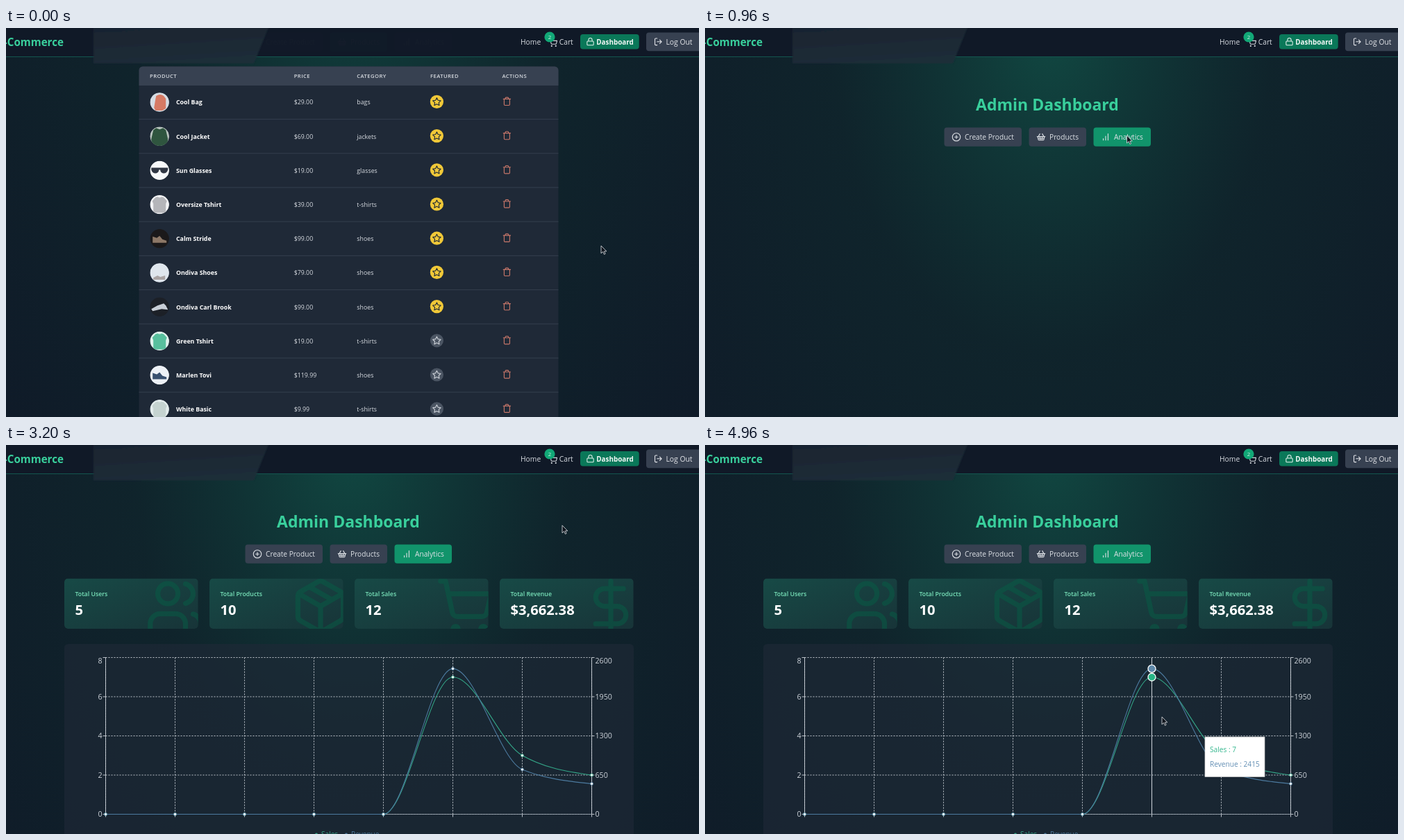
Animation of 998x561 px, one loop 5.04 s. Source, as an HTML page:

```html
<!DOCTYPE html>
<html lang="en">
<head>
<meta charset="utf-8">
<title>Admin Dashboard</title>
<style>
  html, body { margin: 0; width: 100%; height: 100%; overflow: hidden; background: #111827; }
  svg { display: block; width: 100%; height: 100%; }
  text { font-family: "Open Sans", "Noto Sans", sans-serif; white-space: pre; }
</style>
</head>
<body>
<svg id="stage" viewBox="0 0 998 561"></svg>
<script>
const LOOP = 5040, STEP = 80;
const SWITCH = 960, MOUNT = 1025, HOVER = 3760, NEXT_POINT = 4880;

// ---------- markup helpers ----------
const circle = (x, y, r, fill, extra = '') =>
  `<circle cx="${x}" cy="${y}" r="${r}" fill="${fill}" ${extra}/>`;
const rect = (x, y, w, h, r, fill, extra = '') =>
  `<rect x="${x}" y="${y}" width="${w}" height="${h}" rx="${r}" fill="${fill}" ${extra}/>`;
const line = (x1, y1, x2, y2, color, extra = '') =>
  `<path d="M${x1} ${y1}L${x2} ${y2}" stroke="${color}" fill="none" ${extra}/>`;
const text = (x, y, size, fill, str, weight = 500, extra = '') =>
  `<text x="${x}" y="${y}" font-size="${size}" fill="${fill}" font-weight="${weight}" ${extra}>${str}</text>`;

const ring = (x, y, r) => `M${x - r} ${y}a${r} ${r} 0 1 0 ${2 * r} 0a${r} ${r} 0 1 0 ${-2 * r} 0`;
const ICONS = {
  star: 'M12 2l3.09 6.26 6.91 1.01-5 4.87 1.18 6.88L12 17.77l-6.18 3.25L7 14.14 2 9.27l6.91-1.01z',
  trash: 'M3 6h18M19 6v14c0 1-1 2-2 2H7c-1 0-2-1-2-2V6M8 6V4c0-1 1-2 2-2h4c1 0 2 1 2 2v2',
  plus: ring(12, 12, 10) + 'M8 12h8M12 8v8',
  basket: 'M15 11l-1 9M19 11l-4-7M2 11h20M3.5 11l1.6 7.4a2 2 0 0 0 2 1.6h9.8a2 2 0 0 0 2-1.6l1.7-7.4M4.5 15.5h15M5 11l4-7M9 11l1 9',
  bars: 'M12 20V10M18 20V4M6 20v-4',
  cart: ring(8, 21, 1) + ring(19, 21, 1) +
    'M2 2h2l2.7 12.5a2 2 0 0 0 2 1.6h9.8a2 2 0 0 0 1.9-1.6l1.7-7.4H5.1',
  lock: 'M5 11h14a2 2 0 0 1 2 2v7a2 2 0 0 1-2 2H5a2 2 0 0 1-2-2v-7a2 2 0 0 1 2-2zM7 11V7a5 5 0 0 1 10 0v4',
  exit: 'M9 21H5a2 2 0 0 1-2-2V5a2 2 0 0 1 2-2h4M16 17l5-5-5-5M21 12H9',
  users: ring(9, 7, 4) + 'M16 21v-2a4 4 0 0 0-4-4H6a4 4 0 0 0-4 4v2M22 21v-2a4 4 0 0 0-3-3.87M16 3.13a4 4 0 0 1 0 7.75',
  box: 'M21 8a2 2 0 0 0-1-1.73l-7-4a2 2 0 0 0-2 0l-7 4A2 2 0 0 0 3 8v8a2 2 0 0 0 1 1.73l7 4a2 2 0 0 0 2 0l7-4A2 2 0 0 0 21 16zM3.3 7l8.7 5 8.7-5M12 22V12M7.5 4.27l9 5.15',
  dollar: 'M12 2v20M17 5H9.5a3.5 3.5 0 0 0 0 7h5a3.5 3.5 0 0 1 0 7H6'
};
const icon = (name, cx, cy, size, color) =>
  `<path d="${ICONS[name]}" transform="translate(${cx - size / 2} ${cy - size / 2}) scale(${size / 24})"
    fill="none" stroke="${color}" stroke-width="2" stroke-linecap="round" stroke-linejoin="round"/>`;

// ---------- products table ----------
const TEE = 'M-6 -10L-3 -11Q0 -9 3 -11L6 -10L10.5 -5L9 -1V12H-9V-1L-10.5 -5Z';
const SHOE = 'M-10 -3L-4 -1L0 -4L4 1L10 3V6H-10Z';
const PRODUCTS = [
  ['Cool Bag', '$29.00', 'bags', '#d5dce3', '#d67a64', 'M-5 -9Q1 -13 6 -9L9 -5V9L4 12H-6L-8 8L-6 -4Z'],
  ['Cool Jacket', '$69.00', 'jackets', '#b9c4bf', '#2f553f', 'M-5 -12L0 -10L5 -12L9 -9L12 4L11 14H-11L-12 4L-9 -9Z'],
  ['Sun Glasses', '$19.00', 'glasses', '#f7f9fb', '#303744', 'M-12 -4H12V-1Q10 5 5 4Q1 3 1 -1H-1Q-1 3 -5 4Q-10 5 -12 -1Z'],
  ['Oversize Tshirt', '$39.00', 't-shirts', '#f1f2f4', '#b4b5b9', TEE],
  ['Calm Stride', '$99.00', 'shoes', '#1b191a', '#8d7867', SHOE],
  ['Ondiva Shoes', '$79.00', 'shoes', '#dfe6ed', '#aaa4a4', 'M-9 7L-3 4L1 6L8 4V10H-9Z'],
  ['Ondiva Carl Brook', '$99.00', 'shoes', '#1c2027', '#c8ced6', 'M-12 3L-3 -2L6 -5L9 -2L12 4L3 3L-10 6Z'],
  ['Green Tshirt', '$19.00', 't-shirts', '#e0f1ec', '#58bf9d', TEE],
  ['Marlen Tovi', '$119.99', 'shoes', '#edf1f6', '#38506f', SHOE],
  ['White Basic', '$9.99', 't-shirts', '#e3ecec', '#c5d3d0', TEE]
];
const FEATURED = 7, ROW = 49.2;

function productRow([name, price, kind, back, tone, shape], i) {
  const y = 244 + i * ROW, lit = i < FEATURED;
  return line(191.5, y + 24.6, 795.5, y + 24.6, '#374151', 'stroke-width=".9"') +
    `<g transform="translate(221.2 ${y})" clip-path="url(#thumb)">${circle(0, 0, 14, back)}<path d="${shape}" fill="${tone}"/></g>` +
    text(245, y + 3.3, 8.8, '#fff', name, 700) +
    text(414.7, y + 3.3, 8.8, '#d6dae0', price) +
    text(505.3, y + 3.3, 8.8, '#d6dae0', kind) +
    circle(620.4, y - .6, 9.6, lit ? '#f0c838' : '#4b5563') +
    icon('star', 620.4, y - .6, 13.7, lit ? '#1f2937' : '#cbd0d7') +
    icon('trash', 721.4, y - 1.2, 13.7, '#c8776a');
}

function productTable() {
  const heads = [[207, 'PRODUCT'], [414.7, 'PRICE'], [505.3, 'CATEGORY'], [611, 'FEATURED'], [714.5, 'ACTIONS']];
  return rect(191.5, 192.5, 604, 568, 5.5, '#1f2937') +
    '<path d="M191.5 220V198a5.5 5.5 0 0 1 5.5-5.5H790a5.5 5.5 0 0 1 5.5 5.5V220Z" fill="#374151"/>' +
    heads.map(([x, s]) => text(x, 208.9, 7.7, '#d6dae0', s, 600, 'letter-spacing=".4"')).join('') +
    PRODUCTS.map(productRow).join('');
}

// ---------- analytics ----------
const CARDS = [
  ['Total Users', '5', 'users'], ['Total Products', '10', 'box'],
  ['Total Sales', '12', 'cart'], ['Total Revenue', '$3,662.38', 'dollar']
];
function statCard([label, value, pic], i) {
  const x = 84 + i * 209;
  return `<g id="card${i}"><g clip-path="url(#clip${i})">` +
    rect(x, 192.5, 192.7, 72.5, 5, '#1f2937') +
    rect(x, 192.5, 192.7, 72.5, 5, 'url(#sheen)') +
    `<g opacity=".5">${icon(pic, x + 160, 232.5, 87, '#065f46')}</g></g>` +
    text(x + 15.4, 218.2, 8.8, '#78e2b9', label, 600) +
    text(x + 15.4, 245.2, 20.2, '#fff', value, 700) + '</g>';
}

const SALES = [0, 0, 0, 0, 0, 7, 3, 2];
const REVENUE = [0, 0, 0, 0, 0, 2415, 742.2, 505.18];
const GREEN = '#33a587', BLUE = '#4c7a9f', INK = '#cdd3da';
const BASE = 532.5, HIGH = 226;
const px = i => 143.5 + i * 100;
const plot = (data, max) => data.map((v, i) => [px(i), BASE - v / max * HIGH]);
const salesPts = plot(SALES, 8), revenuePts = plot(REVENUE, 2600);

// Monotone cubic through evenly spaced points
function curve(pts) {
  const n = pts.length - 1, h = 100;
  const s = pts.slice(1).map((p, i) => (p[1] - pts[i][1]) / h);
  const m = pts.map((p, i) => i && i < n
    ? (Math.sign(s[i - 1]) + Math.sign(s[i])) *
      Math.min(Math.abs(s[i - 1]), Math.abs(s[i]), Math.abs(s[i - 1] + s[i]) / 4)
    : 0);
  m[0] = (3 * s[0] - m[1]) / 2;
  m[n] = (3 * s[n - 1] - m[n - 1]) / 2;
  return pts.map(([x, y], i) => i
    ? `C${x - h * 2 / 3} ${pts[i - 1][1] + m[i - 1] * h / 3} ${x - h / 3} ${y - m[i] * h / 3} ${x} ${y}`
    : `M${x} ${y}`).join('');
}

function chart() {
  let s = rect(84, 287, 820, 330, 5.5, '#1f2937', 'opacity=".62"');
  const dash = 'stroke-dasharray="2 2" stroke-width=".9"', thin = 'stroke-width=".9"';
  for (let i = 0; i < 5; i++) {
    const y = BASE - i * HIGH / 4, ty = y + (i === 4 ? 8.3 : 3.9);
    s += line(143.5, y, 843.5, y, INK, dash) +
      line(139.5, y, 143.5, y, INK, thin) + line(843.5, y, 847.5, y, INK, thin) +
      text(138.6, ty, 10.7, INK, i * 2, 400, 'text-anchor="end"') +
      text(848.5, ty, 10.7, INK, i * 650, 400);
  }
  for (let i = 0; i < 8; i++) {
    s += line(px(i), 306.5, px(i), BASE, INK, dash) + line(px(i), BASE, px(i), BASE + 4, INK, thin);
  }
  s += line(143.5, 306.5, 143.5, BASE, INK, thin) + line(843.5, 306.5, 843.5, BASE, INK, thin) +
    line(143.5, BASE, 843.5, BASE, '#9aa4af', thin);
  s += line(0, 306.5, 0, BASE, INK, 'id="guide"');
  const stroke = (id, pts, color) =>
    `<path id="${id}" d="${curve(pts)}" fill="none" stroke="${color}" stroke-width="1.1" pathLength="1"/>`;
  s += stroke('sales', salesPts, GREEN) + stroke('revenue', revenuePts, BLUE);
  const dots = (pts, color) => pts.map(([x, y]) => circle(x, y, 2, '#fff', `stroke="${color}" stroke-width=".8"`)).join('');
  s += `<g id="dots">${dots(salesPts, GREEN)}${dots(revenuePts, BLUE)}</g>`;
  const big = 'stroke="#fff" stroke-width="1.3"';
  s += `<g id="active">${circle(0, 0, 5.5, '#27b485', 'id="onSales" ' + big)}${circle(0, 0, 5.5, '#5d88a9', 'id="onRevenue" ' + big)}</g>`;
  s += circle(447, 561.5, 2, GREEN) + text(454, 564.6, 10.1, GREEN, 'Sales') +
    circle(490, 561.5, 2, BLUE) + text(497, 564.6, 10.1, BLUE, 'Revenue');
  return `<g id="chart">${s}</g>`;
}

const tooltip = '<g id="tip">' +
  rect(0, 0, 89, 57.5, 0, '#fff', 'id="tipBox" stroke="#ccc" stroke-width=".7"') +
  text(7, 21.6, 10.15, '#35b78f', '', 400, 'id="tipSales"') +
  text(7, 43.2, 10.15, '#638fb4', '', 400, 'id="tipRevenue"') + '</g>';

// ---------- page frame ----------
const TABS = [
  ['Create Product', 'plus', 344.5, 111.5],
  ['Products', 'basket', 466.5, 82.5],
  ['Analytics', 'bars', 559.5, 82.5]
];
const tab = ([label, pic, x, w], i) =>
  rect(x, 143.5, w, 27.3, 4, '#374151', `id="tab${i}"`) +
  icon(pic, x + 17.5, 157.2, 13.7, '#d9dde2') +
  text(x + 29.5, 160.8, 10.2, '#dde1e6', label);

const nav =
  rect(-2, -2, 1002, 43.5, 0, '#111927', 'opacity=".98"') +
  line(0, 41.5, 998, 41.5, '#14564f') +
  '<path d="M126 -3H379L357 51H126Z" fill="url(#smoke)" filter="url(#soft)"/>' +
  text(83, 26.2, 15.2, '#39cf9c', 'E-Commerce', 700, 'text-anchor="end"') +
  text(741, 23.8, 10.3, '#d6dae0', 'Home') +
  icon('cart', 788, 21, 13, '#d1d5db') +
  circle(783, 13, 7.6, '#12a877') +
  text(783, 15.8, 7.8, '#d5f2e6', '2', 400, 'text-anchor="middle"') +
  text(796.7, 23.8, 10.3, '#d6dae0', 'Cart') +
  rect(827, 9, 84.7, 21.6, 4, '#0a7859') +
  icon('lock', 841.5, 19.6, 12.4, '#e8f3ef') +
  text(850.3, 23.7, 9.9, '#f2f8f6', 'Dashboard', 700) +
  rect(922, 6.5, 82, 26.7, 4, '#374151') +
  icon('exit', 939.3, 19.8, 12.8, '#e5e7eb') +
  text(950.5, 23.8, 10.3, '#e5e7eb', 'Log Out');

const stop = (at, color, alpha = 1) => `<stop offset="${at}" stop-color="${color}" stop-opacity="${alpha}"/>`;
const defs = `<defs>
  <radialGradient id="glow" gradientUnits="userSpaceOnUse" cx="0" cy="0" r="1" gradientTransform="translate(499 0) scale(706 1046)">
    ${stop(0, '#10b981', .3)}${stop(.45, '#0a503c', .21)}${stop(1, '#0a202c', .25)}</radialGradient>
  <linearGradient id="sheen" x1="0" y1="0" x2="1" y2="1">${stop(0, '#059669', .3)}${stop(1, '#064e3b', .3)}</linearGradient>
  <linearGradient id="smoke" x1="0" y1="0" x2=".3" y2="1">${stop(0, '#19232f')}${stop(1, '#1d2d38')}</linearGradient>
  <filter id="soft"><feGaussianBlur stdDeviation="1.3"/></filter>
  <clipPath id="thumb"><circle r="13.7"/></clipPath>
  ${CARDS.map((c, i) => `<clipPath id="clip${i}">${rect(84 + i * 209, 192.5, 192.7, 72.5, 5, '#000')}</clipPath>`).join('')}
</defs>`;

document.getElementById('stage').innerHTML = defs + rect(0, 0, 998, 561, 0, '#111827') +
  '<g id="page">' + rect(0, 0, 998, 900, 0, 'url(#glow)') +
  text(493, 118.6, 23, '#39cf9c', 'Admin Dashboard', 700, 'text-anchor="middle"') +
  TABS.map(tab).join('') +
  `<g id="products">${productTable()}</g>` +
  `<g id="analytics">${CARDS.map(statCard).join('')}${chart()}${tooltip}</g></g>` + nav +
  '<path id="pointer" d="M0 0V11L2.6 8.6L4.4 12.5L6.1 11.7L4.4 8H7.8Z" fill="#10151d" stroke="#e3e6ea" stroke-width=".8"/>';

// ---------- motion ----------
const el = {};
document.querySelectorAll('#stage [id]').forEach(e => { el[e.id] = e; });
const set = (id, attrs) => { for (const k in attrs) el[id].setAttribute(k, attrs[k]); };
const show = (id, on) => set(id, { display: on ? 'inline' : 'none' });
const move = (id, x, y) => set(id, { transform: `translate(${x} ${y})` });
const clamp = u => Math.max(0, Math.min(1, u));
const easeOut = u => 1 - (1 - u) ** 2;

// CSS "ease": cubic-bezier(.25, .1, .25, 1)
function ease(u) {
  let lo = 0, hi = 1, k = .5;
  for (let i = 0; i < 24; i++) {
    k = (lo + hi) / 2;
    const x = .75 * k * (1 - k) + k ** 3;
    if (x < u) lo = k; else hi = k;
  }
  return .3 * k * (1 - k) ** 2 + 3 * k * k * (1 - k) + k ** 3;
}

// Position on a track of [time, x, y] keys
function along(keys, t) {
  const i = keys.findIndex(k => k[0] > t);
  if (i < 0) return keys[keys.length - 1].slice(1);
  if (!i) return keys[0].slice(1);
  const [t0, x0, y0] = keys[i - 1], [t1, x1, y1] = keys[i];
  const u = (t - t0) / (t1 - t0);
  return [x0 + (x1 - x0) * u, y0 + (y1 - y0) * u];
}
const POINTER = [
  [0, 857, 314], [400, 857, 312], [480, 845, 300], [640, 740, 222], [800, 622, 165], [880, 605, 156],
  [1040, 610, 154], [1200, 730, 128], [1360, 801, 118], [2240, 801, 114], [3280, 801, 116],
  [3440, 799, 160], [3600, 793, 265], [3760, 782, 395], [3840, 779, 421], [4240, 774, 428],
  [4560, 770, 424], [4720, 742, 413], [4880, 690, 400], [4960, 658, 392]
];
const TIP = [
  [3760, 100, 302], [3840, 327, 338], [3920, 492, 373], [4000, 597, 398], [4080, 662, 414],
  [4240, 725.5, 429], [4400, 749, 437], [4560, 753, 434], [4880, 753, 425], [4960, 720, 421]
];

function fadeUp(id, t, start) {
  const p = easeOut(clamp((t - start) / 500));
  set(id, { opacity: p });
  move(id, 0, 13.6 * (1 - p));
}

function update(t) {
  move('page', 0, -137 * (1 - clamp(t / 340)) ** 1.6);
  const [cx, cy] = along(POINTER, t);
  move('pointer', cx, cy);

  const picked = t < SWITCH ? 1 : 2;
  TABS.forEach((_, i) => set('tab' + i, { fill: i === picked ? '#11946b' : '#374151' }));
  show('products', t < SWITCH);
  show('analytics', t >= MOUNT);

  CARDS.forEach((_, i) => fadeUp('card' + i, t, MOUNT));
  fadeUp('chart', t, MOUNT + 241);
  const drawn = ease(clamp((t - MOUNT) / 1500));
  const whole = t >= MOUNT + 1500;
  for (const id of ['sales', 'revenue']) {
    set(id, { 'stroke-dasharray': whole ? 'none' : `${drawn} 2` });
  }
  show('dots', whole);

  const hover = t >= HOVER, k = t < NEXT_POINT ? 6 : 5;
  for (const id of ['guide', 'active', 'tip']) show(id, hover);
  move('guide', px(k), 0);
  move('onSales', ...salesPts[k]);
  move('onRevenue', ...revenuePts[k]);
  move('tip', ...along(TIP, t));
  set('tipBox', { width: k === 6 ? 89 : 86 });
  el.tipSales.textContent = 'Sales : ' + SALES[k];
  el.tipRevenue.textContent = 'Revenue : ' + REVENUE[k];
}

const began = performance.now();
function tick() {
  const t = (performance.now() - began) % LOOP;
  update(Math.floor(t / STEP) * STEP);
  requestAnimationFrame(tick);
}
tick();
</script>
</body>
</html>
```
